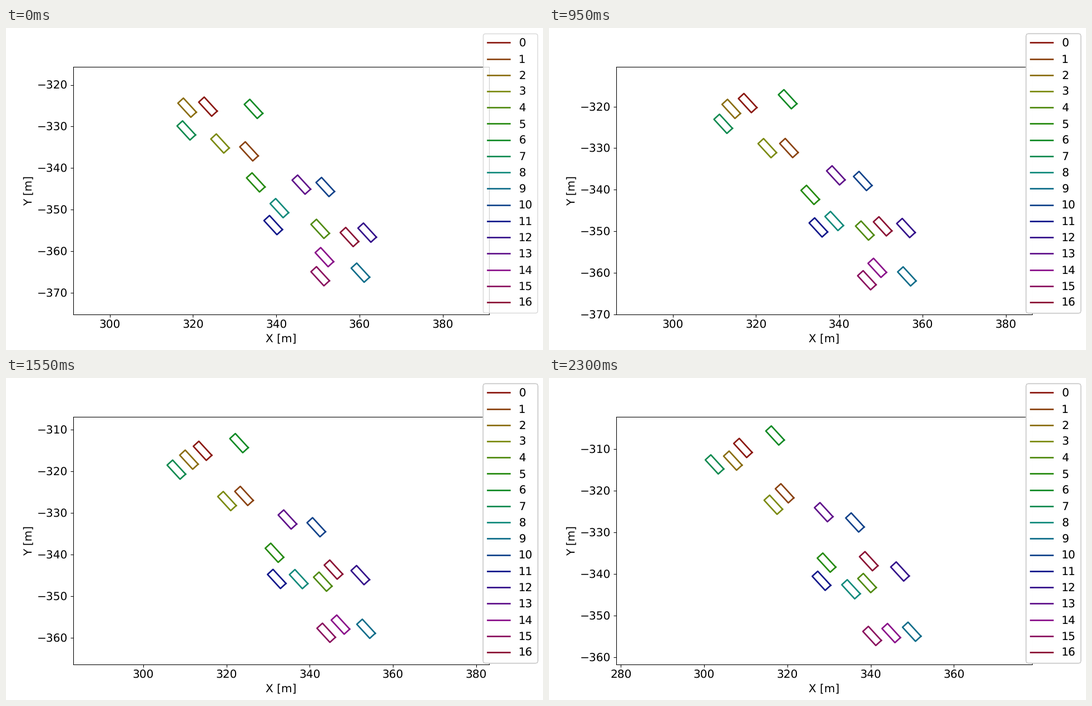
A matplotlib script that plays this animation: 966 px wide and 580 px high, repeating every 2350 ms.

```python
import colorsys

import matplotlib.pyplot as plt
import numpy as np
from matplotlib.animation import FuncAnimation
from matplotlib.ticker import MultipleLocator

FRAMES, INTERVAL = 47, 50
WIDTH, HEIGHT, DPI = 966, 580, 96.6
SPAN = 50                      # half of the visible width in metres
LENGTH, BREADTH = 4.6, 1.8     # vehicle size in metres
LANE_GAP, LANE_SHIFT = 3.853, 0.645
SURGE = 1.9                    # shared acceleration of the traffic
LEGEND_LAYERS = 8

# The road runs straight; traffic drives towards its upper left end.
ORIGIN = np.array([341.22, -345.41])
SLOPE = np.radians(47.47)
ALONG = np.array([np.cos(SLOPE), -np.sin(SLOPE)])
ACROSS = np.array([np.sin(SLOPE), np.cos(SLOPE)])

# One entry per lane, {vehicle: (start along the road, metres per loop)}.
LANES = [
    {7: (-26.1, 23.5), 11: (4.8, 16.4), 15: (21.5, 15.1)},
    {2: (-30.0, 17.3), 3: (-18.3, 14.6), 5: (-5.6, 8.4), 8: (2.8, 8.1),
     14: (18.8, 9.8)},
    {0: (-26.8, 21.1), 1: (-12.2, 20.9), 4: (13.1, 16.9), 9: (27.4, 15.3)},
    {13: (2.2, 25.6), 16: (19.3, 26.7)},
    {6: (-19.0, 25.9), 10: (6.5, 23.0), 12: (21.4, 21.9)},
]
traffic = sorted((name, (lane - 2) * LANE_GAP + LANE_SHIFT, start, speed)
                 for lane, cars in enumerate(LANES)
                 for name, (start, speed) in cars.items())
_, side, start, speed = np.array(traffic).T
count = len(traffic)

corners = np.array([(1, 1), (1, -1), (-1, -1), (-1, 1), (1, 1)])
OUTLINE = corners * (LENGTH / 2, BREADTH / 2) @ np.array([ALONG, ACROSS])

plt.rcParams.update({"font.family": "DejaVu Sans", "font.size": 15,
                     "text.hinting": "none"})
# The small surplus keeps the canvas from being rounded down.
fig, ax = plt.subplots(figsize=((WIDTH + 0.01) / DPI, (HEIGHT + 0.01) / DPI),
                       dpi=DPI)
fig.subplots_adjust(left=0.125, right=0.9, bottom=0.11, top=0.88)
ax.set(xlabel="X [m]", ylabel="Y [m]")
ax.xaxis.set_major_locator(MultipleLocator(20))
ax.yaxis.set_major_locator(MultipleLocator(10))
RISE = SPAN * (0.77 * HEIGHT) / (0.775 * WIDTH)

lines = [
    ax.plot([], [], lw=2, label=str(i),
            color=colorsys.hls_to_rgb(i / count + 0.01, 0.3, 0.8))[0]
    for i in range(count)
]
# Translucent legends pile up over the first frames.
legends = [fig.legend(handles=lines, loc="upper right", labelspacing=0.491)
           for _ in range(LEGEND_LAYERS)]


def positions(u):
    """Vehicle centres at the fraction u of the loop."""
    along = start - speed * u + SURGE * u * (1 - u)
    return ORIGIN + np.outer(along, ALONG) + np.outer(side, ACROSS)


def update(frame):
    centres = positions(frame / (FRAMES - 1))
    x, y = centres.mean(axis=0)
    ax.set_xlim(x - SPAN, x + SPAN)
    ax.set_ylim(y - RISE, y + RISE)
    for line, centre in zip(lines, centres):
        line.set_data(*(OUTLINE + centre).T)
    for i, legend in enumerate(legends):
        legend.set_visible(i <= frame)
    return lines


anim = FuncAnimation(fig, update, frames=FRAMES, interval=INTERVAL,
                     init_func=lambda: update(0), repeat=True)
plt.show()
```
